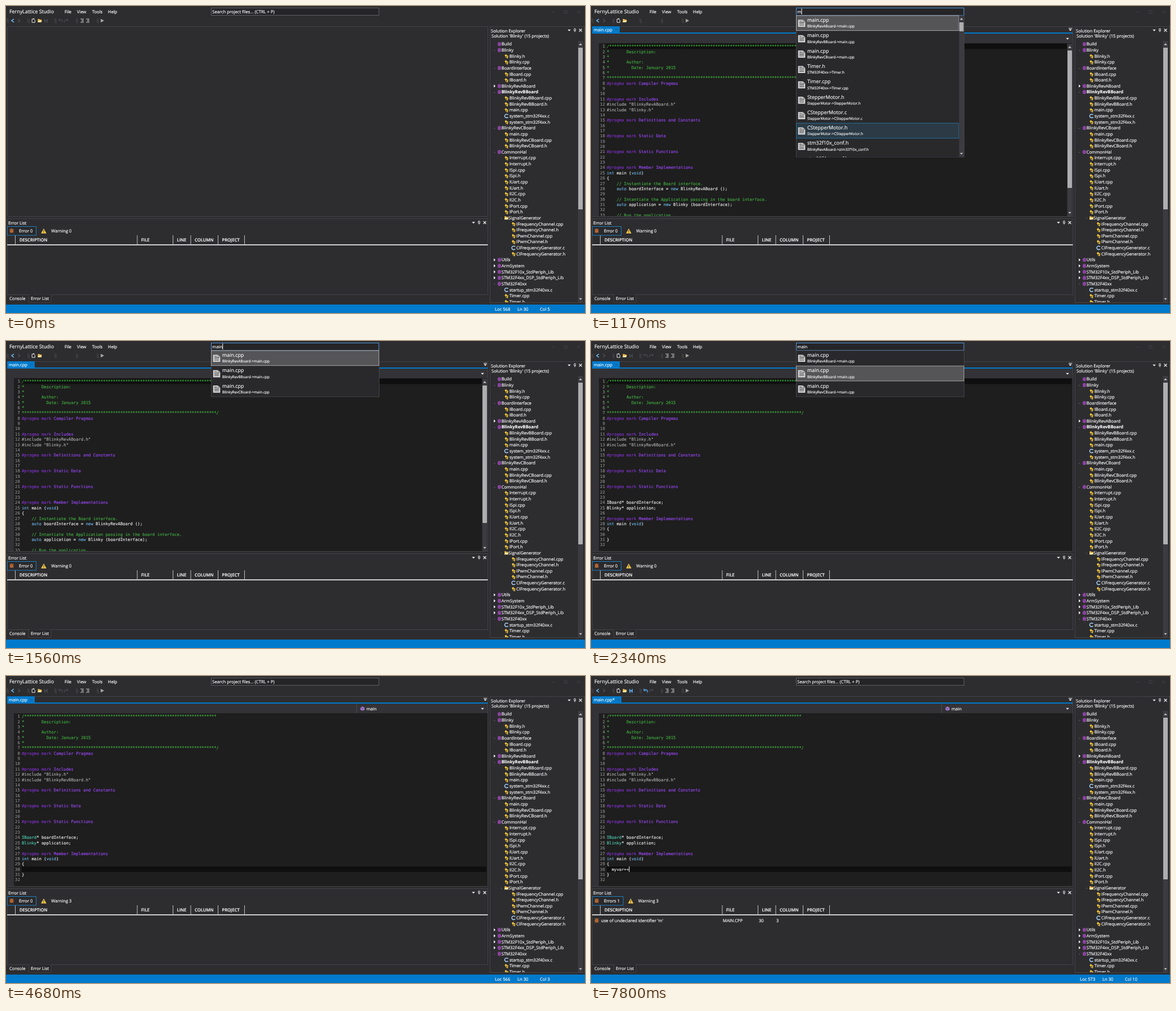
An HTML page that plays this animation: 1028 px wide and 545 px high, repeating every 8 s.

```html
<!DOCTYPE html>
<html lang="en">
<head>
<meta charset="utf-8">
<title>Code editor</title>
<style>
html, body { margin: 0; width: 100%; height: 100%; overflow: hidden; background: #2d2d30; }
svg { display: block; width: 100%; height: 100%; }
text, tspan { fill: currentColor; stroke: currentColor; stroke-width: .16; }
text {
  font: 7.65px "Open Sans", "Noto Sans", sans-serif; color: #fafafa; white-space: pre;
  text-rendering: geometricPrecision; font-variant-ligatures: none;
}
.code { font: 7.276px "DejaVu Sans Mono", "Liberation Mono", monospace; color: #ececec; }
.num { color: #8c8c8c; text-anchor: end; }
.comment { color: #42ab42; }
.pragma { color: #7d32c4; }
.mark { color: #9848f2; }
.include { color: #a8a8a8; }
.keyword { color: #6cb2e4; }
.type { color: #4ec9b0; }
.big { font-size: 8.9px; }
.small { font-size: 6.4px; }
.semi { font-weight: 600; }
.bold { font-weight: 700; }
</style>
</head>
<body>
<svg id="stage" viewBox="0 0 1028 545" preserveAspectRatio="none">
  <defs>
    <clipPath id="treeClip"><rect x="860" y="60" width="156" height="466"/></clipPath>
    <clipPath id="editorClip"><rect x="2" y="36" width="853" height="337"/></clipPath>
    <clipPath id="listClip"><rect x="364" y="16" width="299" height="252.5"/></clipPath>
  </defs>
  <g id="frame"></g>
  <g id="live"></g>
</svg>
<script>
const DURATION = 8000, CHAR = 4.38, LINE = 9.36, ITEM = 27.3;
const BLUE = '#007acc', EDGE = '#434348', THUMB = '#aeaeb0';

const escapeText = s => s.replace(/&/g, '&amp;').replace(/</g, '&lt;').replace(/>/g, '&gt;');
// y is the middle of the capitals
const label = (x, y, s, cls = '') => `<text x="${x}" y="${y + 2.7}" class="${cls}">${escapeText(s)}</text>`;
const box = (x, y, w, h, fill, stroke = 'none') =>
  `<rect x="${x}" y="${y}" width="${w}" height="${h}" fill="${fill}" stroke="${stroke}"/>`;
const path = (d, fill, stroke = 'none', width = 1) =>
  `<path d="${d}" fill="${fill}" stroke="${stroke}" stroke-width="${width}"/>`;
const at = (x, y, body) => `<g transform="translate(${x} ${y})">${body}</g>`;

const down = (x, y, fill = '#f0f0f0') => path(`M${x - 2.8} ${y - 1.2}h5.6l-2.8 3z`, fill);
const up = (x, y) => path(`M${x - 3} ${y + 1.5}h6l-3 -3.2z`, '#c4c4c4');

function scrollbar(x, top, bottom, from, to, w = 8) {
  const mid = x + w / 2;
  return box(x - .5, top, w + 1, bottom - top, '#3b3b40') + up(mid, top + 6) +
    down(mid, bottom - 6, '#c4c4c4') + box(x, from, w, to - from, THUMB);
}

const icons = {
  project: path('M-3 -2.4l3 -1.3l3 1.3v4.8l-3 1.3l-3 -1.3z', '#9748ad') +
    path('M-3 -2.4l3 1.2l3 -1.2M-3 .4l3 1.2l3 -1.2', 'none', '#5f2a70', .6),
  cpp: path('M-1 -3.4l2.2 2.2l-2.4 2.4l-2.2 -2.2zM2 -1.3l1.6 1.6l-1.6 1.6l-1.6 -1.6zM1.6 1.4l1.5 1.5l-1.5 1.5l-1.5 -1.5z', '#f2c63a') +
    path('M-1 0h3M-1 0v2.8h2.5', 'none', '#f2c63a', .8),
  c: path('M3 -2.2C-1 -4.5 -3.2 -1.8 -3.2 0S-1 4.5 3 2.2', 'none', '#a6d0f5', 1.5),
  folder: path('M-3.5 3v-6h2.6l.8 1h3.2v1.5h.9l-1.5 3.5z', '#ebb84a') + path('M-2.8 .2h6l-1 2.4h-6z', '#fff0bd'),
  bug: path('M-3.8 -3l2 1.4M3.8 -3l-2 1.4M-4.2 .4h8.4M-3.6 3.8l2 -1.6M3.6 3.8l-2 -1.6', 'none', '#c98348', .9) +
    '<ellipse rx="2.5" ry="3.7" fill="#cf7338"/>' + path('M0 -1.5v4.5M-2 -1.4h4', 'none', '#70351c', .6),
  warning: path('M0 -4.4l4.8 8.8h-9.6z', '#f4c94c') + path('M0 -1.5v3M0 2.4v1', 'none', '#332b12', 1.1),
  doc: path('M-6.3 -6.3h8.8l3.8 3.8v8.8h-12.6z', '#d8d8d8') +
    path('M-4.3 -3.8h5M-4.3 -1.4h8.6M-4.3 1h8.6M-4.3 3.4h8.6', 'none', '#4a4a4a', 1.1) +
    path('M2.5 -6.3v3.8h3.8', 'none', '#666', .8),
  newFile: path('M-2.8 -2.8h3l2.2 2v4h-5.2zM-1 -3.6h2.5', 'none', '#e6e6e6', 1),
  indent: path('M-3 -3h6M-1 -1h4M-1 1h4M-3 3h6', 'none', '#bcbcbc', 1.1),
  play: path('M-2.8 -3.2l6 3.2l-6 3.2z', '#a4aaa2')
};
const icon = (name, x, y) => at(x, y, icons[name]);
const panelButtons = (x, y) => down(x, y) +
  path(`M${x + 8} ${y + .8}h4M${x + 8.7} ${y + .5}v-3.2h2.5v3.2M${x + 10} ${y + .8}v2.6`, 'none', '#f0f0f0', .9) +
  path(`M${x + 17.5} ${y - 2.5}l5 5m0 -5l-5 5`, 'none', '#f0f0f0', 1.1);

// depth, kind, name; kind is + open project, - closed project, = plain project, f folder
const tree = `0=Build|0+Blinky|1 Blinky.h|1 Blinky.cpp|0+BoardInterface|1 IBoard.cpp|1 IBoard.h|0-BlinkyRevABoard
0+BlinkyRevBBoard|1 BlinkyRevBBoard.cpp|1 BlinkyRevBBoard.h|1 main.cpp|1 system_stm32f4xx.c|1 system_stm32f4xx.h
0+BlinkyRevCBoard|1 main.cpp|1 BlinkyRevCBoard.cpp|1 BlinkyRevCBoard.h|0+CommonHal|1 Interrupt.cpp|1 Interrupt.h
1 ISpi.cpp|1 ISpi.h|1 IUart.cpp|1 IUart.h|1 II2C.cpp|1 II2C.h|1 IPort.cpp|1 IPort.h|1fSignalGenerator
2 IFrequencyChannel.cpp|2 IFrequencyChannel.h|2 IPwmChannel.cpp|2 IPwmChannel.h|2 CIFrequencyGenerator.c
2 CIFrequencyGenerator.h|0-Utils|0-ArmSystem|0-STM32F10x_StdPeriph_Lib|0-STM32F4xx_DSP_StdPeriph_Lib
0+STM32F40xx|1 startup_stm32f40xx.c|1 Timer.cpp|1 Timer.h`.split(/[|\n]/);

function treeRow(row, i) {
  const depth = +row[0], kind = row[1], name = row.slice(2), y = 67.6 + 10.64 * i;
  const iconX = 876 + 12.6 * depth;
  const type = kind === 'f' ? 'folder' : kind !== ' ' ? 'project' : name.endsWith('.c') ? 'c' : 'cpp';
  const arrow = kind === '-' ? path(`M866 ${y - 2.7}l3.2 2.7l-3.2 2.7z`, '#f0f0f0')
    : kind === '+' || kind === 'f' ? path(`M${iconX - 10} ${y + .7}h2.4`, 'none', '#606065', 1) : '';
  const textX = kind === 'f' ? 892.3 : [879.7, 893.7, 906][depth];
  return arrow + icon(type, iconX, y) + label(textX, y, name, name === 'BlinkyRevBBoard' ? 'bold' : '');
}

function drawFrame() {
  const titleBar = label(6, 10.5, 'FernyLattice Studio', 'big') +
    [[104, 'File'], [126, 'View'], [153, 'Tools'], [181, 'Help']].map(([x, s]) => label(x, 10, s)).join('') +
    path('M968 11h6M991 8h5v5h-5zM1014 8l5 5m0 -5l-5 5', 'none', '#414146');
  const grips = [3, 40, 88, 126, 163].map(x =>
    path(`M${x - 1} 22.5v8M${x + 1} 24v8`, 'none', '#77777c', 1).replace('/>', ' stroke-dasharray="1 1.7"/>')).join('');
  const toolbar = grips + path('M14 23l-4 3l4 3', 'none', '#75c5ff', 1.5) +
    path('M21 23l4 3l-4 3', 'none', '#505056', 1.4) +
    icon('newFile', 49, 26) + icon('folder', 60, 26) + icon('play', 171, 26);
  const explorer = box(859.5, 36.5, 168, 490, 'none', EDGE) +
    label(861, 44, 'Solution Explorer') + panelButtons(1000, 43) +
    label(862, 53.5, "Solution 'Blinky' (15 projects)") +
    `<g clip-path="url(#treeClip)">${tree.map(treeRow).join('')}</g>` + scrollbar(1016, 62, 526, 74, 361);
  const columns = [[24, 'DESCRIPTION'], [240, 'FILE'], [303.5, 'LINE'], [335, 'COLUMN'], [383.5, 'PROJECT']];
  const errorPanel = box(2.5, 377.5, 853, 135, 'none', EDGE) + label(4, 385.5, 'Error List') + panelButtons(830, 384.5) +
    columns.map(([x, s]) => label(x, 415.5, s, 'semi')).join('') +
    path('M16.5 407v17M233 407v17M296.5 407v17M328 407v17M376.5 407v17M423.5 407v17', 'none', '#c0c0c0', 1) +
    box(2, 423, 853.5, 2, '#cecece') +
    path('M40.5 512.5v13.5h39.5v-13.5', '#29292c', EDGE) + label(6, 519, 'Console') + label(44, 519, 'Error List');
  return titleBar + toolbar + box(2.5, 36.5, 853, 337, 'none', EDGE) + explorer + errorPanel +
    box(0, 530, 1028, 15, BLUE);
}

const stars = n => '*'.repeat(n);
const opening = ['/' + stars(78), '*       Description:', '*', '*       Author:', '*         Date: January 2015', '*',
  stars(79) + '/', '#pragma mark Compiler Pragmas', '', '', '#pragma mark Includes'];
const middle = ['', '#pragma mark Definitions and Constants', '', '', '#pragma mark Static Data', '', '',
  '#pragma mark Static Functions', '', ''];
const ending = ['#pragma mark Member Implementations', 'int main (void)', '{'];
const files = {
  A: () => [...opening, '#include "BlinkyRevABoard.h"', '#include "Blinky.h"', ...middle, ...ending,
    '    // Instantiate the Board interface.', '    auto boardInterface = new BlinkyRevABoard ();', '',
    '    // Intantiate the Application passing in the board interface.',
    '    auto application = new Blinky (boardInterface);', '', '    // Run the application.'],
  B: typed => [...opening, '#include "Blinky.h"', '#include "BlinkyRevBBoard.h"', ...middle,
    'IBoard* boardInterface;', 'Blinky* application;', '', ...ending, '  ' + typed, '}', '']
};

const span = (cls, s) => `<tspan class="${cls}">${s}</tspan>`;
function highlight(line, parsed) {
  const s = escapeText(line);
  if (/^\s*(\*|\/)/.test(s)) return span('comment', s);
  if (s.startsWith('#pragma')) return span('pragma', s.slice(0, 12)) + span('mark', s.slice(12));
  if (s.startsWith('#')) return span('include', s);
  const out = s.replace(/\b(int|void|auto|new)\b/g, m => span('keyword', m));
  return parsed ? out.replace(/^(IBoard|Blinky)(?=\*)/, m => span('type', m)) : out;
}

function editor(s) {
  const lines = files[s.file](s.typed), lineY = n => 71.6 + LINE * (n - 1);
  const long = s.file === 'A', right = long ? 845 : 853, tabWidth = s.dirty ? 52 : 49;
  let out = box(2, 36, tabWidth, 12, BLUE) + box(2, 47, 853, 2, BLUE) +
    label(5, 42.5, s.dirty ? 'main.cpp*' : 'main.cpp') +
    path(`M${tabWidth - 6} 40l4.5 4.5m0 -4.5l-4.5 4.5`, 'none', '#2b5f8a', 1) +
    path('M848 39.5h6', 'none', '#f0f0f0', 1) + down(851, 42.5) +
    box(2, 49, 853, 17, '#333337') + path('M622.5 50v16', 'none', '#4a4a50') + down(846, 58) +
    box(2, 66, 853, 307, '#1e1e1e') + box(2, 66, 12, 307, '#333337') +
    box(28, lineY(s.line) - 4.8, right - 28, 9.6, '#0f0f0f');
  if (s.symbol) {
    out += at(633, 58, path('M-3.5 -2l3.5 -1.8l3.5 1.8v4l-3.5 1.8l-3.5 -1.8z', '#b180d7') +
      path('M-3.5 -2l3.5 1.8l3.5 -1.8M0 -.2v4', 'none', '#573670', .8)) + label(640, 58.5, s.symbol);
  }
  lines.forEach((line, i) => {
    const y = lineY(i + 1) + 2.6;
    out += `<text class="code num" x="24.8" y="${y}">${i + 1}</text>` +
      `<text class="code" x="28" y="${y}">${highlight(line, s.parsed)}</text>`;
  });
  if (s.caret) {
    const column = s.line === 30 ? 2 + s.typed.length : 0;
    out += box(28 + CHAR * column, lineY(s.line) - 5, 1, 10, '#fff');
  }
  if (long) out += scrollbar(846, 67, 373, 79, 323);
  return `<g clip-path="url(#editorClip)">${out}</g>`;
}

const mains = ['A', 'B', 'C'].map(v => [`BlinkyRev${v}Board`, 'main.cpp']);
const lists = {
  main: mains,
  all: [...mains, ['STM32F40xx', 'Timer.h'], ['STM32F40xx', 'Timer.cpp'], ['StepperMotor', 'StepperMotor.h'],
    ['StepperMotor', 'CStepperMotor.c'], ['StepperMotor', 'CStepperMotor.h'],
    ['BlinkyRevABoard', 'stm32f10x_conf.h'], ['BlinkyRevBBoard', 'stm32f4xx_conf.h']]
};

function results(s) {
  const all = s.list === 'all', height = all ? 251.5 : 82, width = all ? 289 : 298;
  const row = ([project, name], i) => {
    const y = 17 + ITEM * i;
    const back = i === s.pick ? box(364.5, y, width - .5, 26.6, '#555558', '#a6a6a8')
      : all && i === 7 ? box(364.5, y, width - .5, 26.6, '#2b3a45', '#286f98') : '';
    return back + icon('doc', 374, y + 13.8) + label(384, y + 8.3, name, 'big') +
      label(384, y + 18.6, `${project}->${name}`, 'small');
  };
  return `<g clip-path="url(#listClip)">` + box(364.5, 17, 298, height, '#29292c', EDGE) +
    lists[s.list].map(row).join('') + (all ? scrollbar(654, 17, 268, 29, 45, 7.5) : '') + '</g>';
}

function search(s) {
  const text = s.focus ? s.query : 'Search project files... (CTRL + P)';
  const caretX = { '': 366.5, m: 373.5, ma: 377.8, mai: 379.7, main: 384.2 }[s.query];
  return box(364.5, 3.5, 297.5, 13, '#252528', s.focus ? '#569de5' : '#606065') + label(366.3, 10, text) +
    (s.focus && s.qCaret ? box(caretX, 4.5, 1, 10.5, '#fff') : '');
}

function tools(s) {
  const save = s.dirty ? '#55aaf0' : '#46464c', undo = s.dirty ? '#55aaf0' : '#46464c';
  const hook = 'M3 3.2C4.3 -1 1 -3 -2.4 -1M-2.8 -3.4v3.2h3.2';
  return path('M68 23h6v6.5h-6z', save) + path('M69.5 23v2.2h3v-2.2M69.5 29.5v-2h3v2', '#2d2d30') +
    at(97, 26, path(hook, 'none', undo, 1.3)) +
    `<g transform="translate(107 26) scale(-1 1)">${path(hook, 'none', '#46464c', 1.3)}</g>` +
    icon('indent', 135, 26) + icon('indent', 145, 26);
}

function errors(s) {
  const shift = s.errors ? 3.5 : 0;
  const row = s.errors ? icon('bug', 10, 434) + [[18, "use of undeclared identifier 'm'"], [234, 'MAIN.CPP'],
    [298, '30'], [329, '3']].map(([x, t]) => label(x, 434, t)).join('') : '';
  return box(2.5, 391.5, 51 + shift, 15.5, '#29292c', '#207fbd') + icon('bug', 10, 399) +
    label(23, 399.5, s.errors ? 'Errors 1' : 'Error 0') +
    icon('warning', 67 + shift, 399.3) + label(80.3 + shift, 399.3, `Warning ${s.warnings}`) + row;
}

function status(s) {
  if (!s.status) return '';
  const [loc, ln, col] = s.status, n = s.typed.length;
  return label(868, 538, `Loc ${loc + n}`) + label(908, 538, `Ln ${ln}`) + label(948, 538, `Col ${col + n}`);
}

const steps = [
  [0, { query: '', typed: '', line: 1, pick: 0, warnings: 0, tools: true, status: [568, 30, 5] }],
  [130, { focus: true, qCaret: true }],
  [780, { qCaret: false }],
  [1040, { query: 'm', qCaret: true }],
  [1170, { file: 'A', list: 'all', tools: false, status: null }],
  [1300, { query: 'ma' }],
  [1430, { query: 'mai', list: 'main' }],
  [1560, { query: 'main' }],
  [1690, { tools: true }],
  [2080, { qCaret: false }],
  [2340, { file: 'B', pick: 1 }],
  [2600, { focus: false, list: null }],
  [2730, { caret: true, status: [0, 1, 1] }],
  [3250, { caret: false }],
  [3380, { parsed: true }],
  [3510, { warnings: 3 }],
  [4030, { line: 30, caret: true, status: [566, 30, 3] }],
  [4160, { symbol: 'main' }],
  [4680, { caret: false }],
  [5200, { caret: true }],
  [5460, { typed: 'm' }],
  [5590, { dirty: true }],
  [6110, { caret: false }],
  [6240, { errors: 1 }],
  [6370, { typed: 'my', caret: true }],
  [6500, { typed: 'myv' }],
  [6890, { typed: 'myva' }],
  [7020, { typed: 'myvar' }],
  [7670, { typed: 'myvar+' }],
  [7800, { typed: 'myvar++' }]
];
const states = steps.map((_, i) => Object.assign({}, ...steps.slice(0, i + 1).map(step => step[1])));

const live = document.getElementById('live');
let shown = -1;
function render(time) {
  const index = steps.findLastIndex(step => step[0] <= time);
  if (index === shown) return;
  shown = index;
  const s = states[index];
  live.innerHTML = (s.tools ? tools(s) : '') + (s.file ? editor(s) : '') + errors(s) + status(s) +
    search(s) + (s.list ? results(s) : '');
}

document.getElementById('frame').innerHTML = drawFrame();
const start = performance.now();
function tick() {
  render((performance.now() - start) % DURATION);
  requestAnimationFrame(tick);
}
tick();
</script>
</body>
</html>
```
